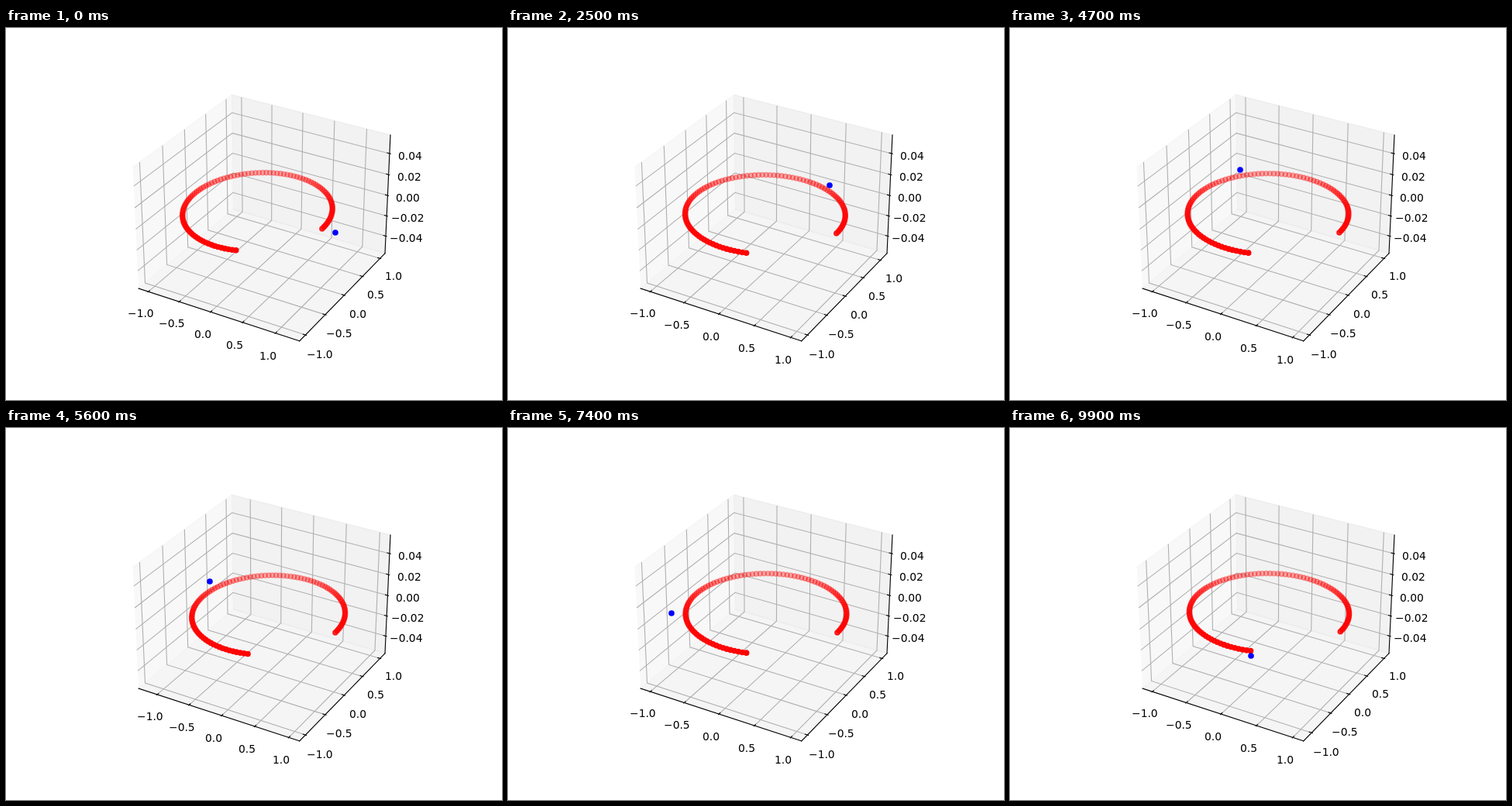
Animation, 640 px wide and 480 px high, one loop 10000 ms. Source, as an HTML page with a canvas:

```html
<!DOCTYPE html>
<html>
<head>
<meta charset="utf-8">
<style>
html, body { margin: 0; width: 100%; height: 100%; overflow: hidden; background: #fff; }
canvas { display: block; }
</style>
</head>
<body>
<canvas id="c" width="640" height="480"></canvas>
<script>
const ctx = document.getElementById('c').getContext('2d');
const PT = 100 / 72;                 // pixels per point
const N = 100, STEP = 100;           // frames and ms per frame
const MARGIN = 0.05;

// Half sizes of the 4:4:3 box: the data limits, and the drawn walls
const unit = 1.8294640721620434 / Math.hypot(4, 4, 3);
const half = [2 * unit, 2 * unit, 1.5 * unit];
const wall = half.map(h => h * 25 / 24);
const delta = half.map(h => h / 6);

// Camera: elevation 30, azimuth -60, distance 10
const DIST = 10, C = Math.cos(Math.PI / 6), S = 0.5;
const SCALE = 369.6 / 0.185, OX = 143.2 + 0.095 * SCALE, OY = 427.2 - 0.095 * SCALE;

function project([x, y, z]) {
  const p = C * x + S * y, q = C * y - S * x;
  const depth = DIST + C * q - S * z;
  return { x: OX + SCALE * p / depth, y: OY - SCALE * (S * q + C * z) / depth, z: -DIST / depth };
}

const angle = i => 5 * i / (N - 1);
const ring = Array.from({ length: N }, (_, i) => [Math.cos(angle(i)), Math.sin(angle(i)), 0]);

function limits(values) {
  const lo = Math.min(...values), hi = Math.max(...values);
  return { mid: (lo + hi) / 2, span: (hi - lo) / 2 * (1 + 2 * MARGIN) };
}

function trace(points) {
  ctx.beginPath();
  points.map(project).forEach((p, i) => i ? ctx.lineTo(p.x, p.y) : ctx.moveTo(p.x, p.y));
}

function line(points, color, width, cap = 'butt') {
  trace(points);
  ctx.strokeStyle = color;
  ctx.lineWidth = width * PT;
  ctx.lineCap = cap;
  ctx.stroke();
}

function pane(points, level) {
  const g = Math.round(level * 255);
  ctx.fillStyle = `rgba(${g},${g},${g},0.5)`;
  trace(points);
  ctx.fill();
  line(points, ctx.fillStyle, 1);
}

function label(text, p) {
  const m = ctx.measureText(text);
  const ink = m.actualBoundingBoxRight + m.actualBoundingBoxLeft;
  ctx.fillText(text, Math.round(p.x - ink / 2), Math.round(p.y + 11));
}

function dot(p, rgb, alpha) {
  const color = `rgba(${rgb},${alpha})`;
  ctx.beginPath();
  ctx.arc(p.x, p.y, Math.sqrt(20) / 2 * PT, 0, 2 * Math.PI);
  ctx.fillStyle = ctx.strokeStyle = color;
  ctx.lineWidth = PT;
  ctx.fill();
  ctx.stroke();
}

const [W, D, H] = wall;
const corner = (x, y, z) => [x * W, y * D, z * H];

// edge: signs of the edge carrying the ticks; out: axis the ticks point along
const axes = [
  { k: 0, edge: [0, -1, -1], out: 1, step: 0.5, digits: 1,
    grid: v => [[v, -D, -H], [v, D, -H], [v, D, H]] },
  { k: 1, edge: [1, 0, -1], out: 0, step: 0.5, digits: 1,
    grid: v => [[W, v, -H], [-W, v, -H], [-W, v, H]] },
  { k: 2, edge: [1, 1, 0], out: 0, step: 0.02, digits: 2,
    grid: v => [[-W, -D, v], [-W, D, v], [W, D, v]] }
];
const PAD = 11.5 * 48 / (2 * 369.6 * 0.72);   // label distance in deltas

function drawAxis(axis, lim) {
  const { k, edge, out, step, digits, grid } = axis;
  const base = edge.map((s, i) => s * wall[i]);
  const at = (i, v) => { const p = base.slice(); p[i] = v; return p; };
  line([at(k, -wall[k]), at(k, wall[k])], '#000', 0.8, 'square');

  const ticks = [-2, -1, 0, 1, 2].map(n => ({
    value: n * step,
    pos: (n * step - lim.mid) / lim.span * half[k]
  }));
  ticks.forEach(t => line(grid(t.pos), '#b0b0b0', 0.8));
  ctx.fillStyle = '#000';
  ticks.forEach(t => {
    const tip = f => {
      const p = at(k, t.pos);
      p[out] += f * edge[out] * delta[out];
      return p;
    };
    line([tip(0.1), tip(-0.2)], '#000', 0.8);
    const spot = at(k, t.pos).map((v, i) => v + edge[i] * PAD * delta[i]);
    label(t.value.toFixed(digits).replace('-', '\u2212'), project(spot));
  });
}

function draw(frame) {
  const a = angle(frame);
  const mover = [1.2 * Math.cos(a), 1.1 * Math.sin(a), 0];
  const all = [...ring, mover];
  const lims = [limits(all.map(p => p[0])), limits(all.map(p => p[1])), { mid: 0, span: 0.055 }];
  const place = p => project(p.map((v, i) => (v - lims[i].mid) / lims[i].span * half[i]));

  ctx.fillStyle = '#fff';
  ctx.fillRect(0, 0, 640, 480);
  ctx.font = `${10 * PT}px "DejaVu Sans", sans-serif`;

  pane([corner(-1, -1, -1), corner(-1, 1, -1), corner(-1, 1, 1), corner(-1, -1, 1)], 0.95);
  pane([corner(-1, 1, -1), corner(1, 1, -1), corner(1, 1, 1), corner(-1, 1, 1)], 0.9);
  pane([corner(-1, -1, -1), corner(1, -1, -1), corner(1, 1, -1), corner(-1, 1, -1)], 0.925);
  axes.forEach((axis, i) => drawAxis(axis, lims[i]));

  // Far dots first, fading with depth
  const dots = ring.map(place).sort((p, q) => q.z - p.z);
  const far = dots[0].z, near = dots[N - 1].z;
  const drawRing = () => dots.forEach(p => dot(p, '255,0,0', 1 - 0.7 * (p.z - near) / (far - near)));
  const m = place(mover);
  const drawMover = () => dot({ x: Math.round(m.x), y: Math.round(m.y) }, '0,0,255', 1);
  const order = m.z > near ? [drawMover, drawRing] : [drawRing, drawMover];
  order.forEach(f => f());
}

let last = -1;
const start = performance.now();
function tick() {
  const frame = Math.floor(Math.max(0, performance.now() - start) / STEP) % N;
  if (frame !== last) draw(last = frame);
  requestAnimationFrame(tick);
}
tick();
</script>
</body>
</html>
```
